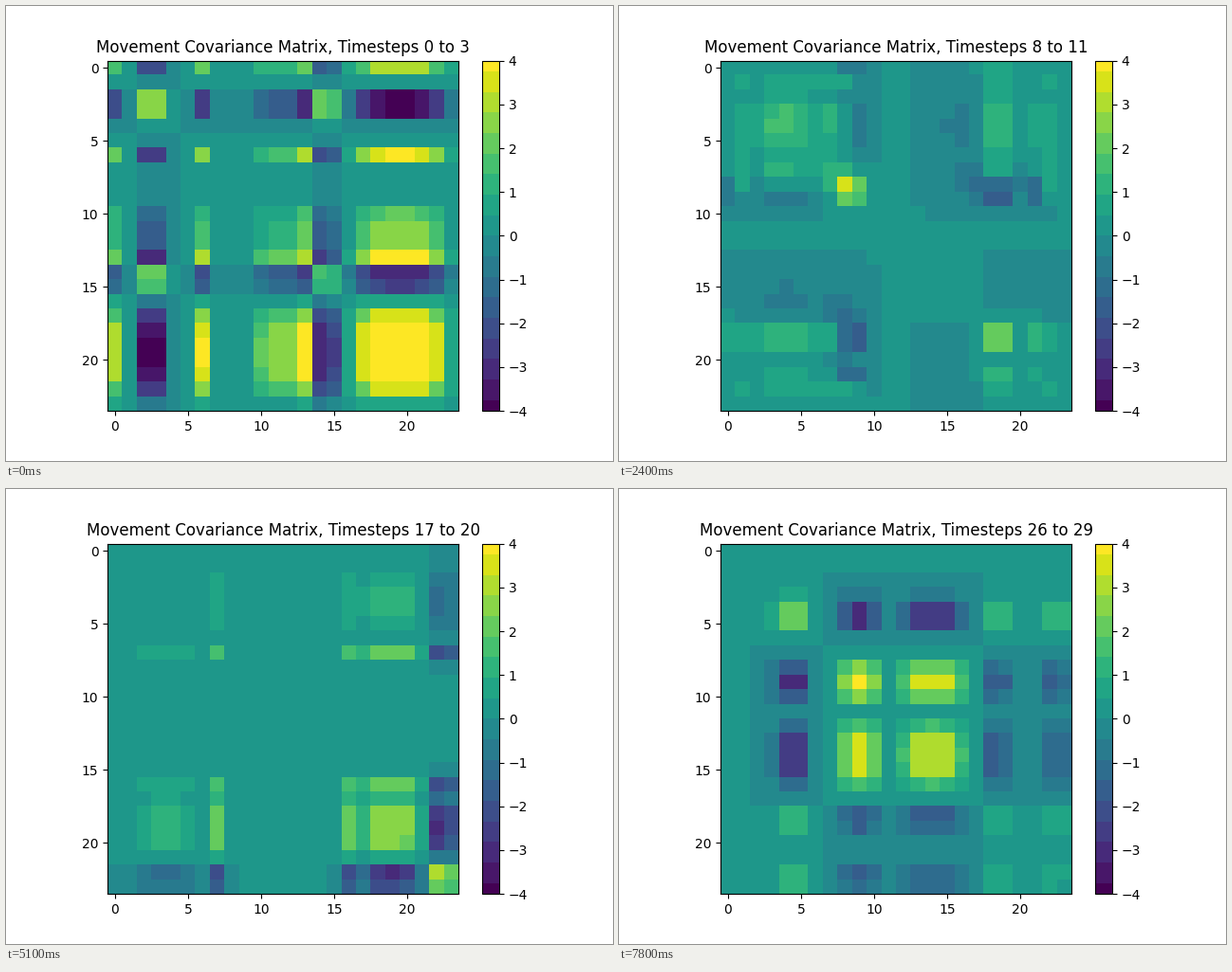
Recreate the animation shown at these times as a matplotlib script. Size 640 by 480 pixels, loop 8 s.

```python
import numpy as np
import matplotlib.pyplot as plt
from matplotlib.animation import FuncAnimation
from matplotlib.colors import ListedColormap

TICK_MS = 100
LOOP_MS = 8000
STEP_MS = 300
LAST_STEP = 26
WINDOW = 3
LEVELS = 18
JOINTS = np.arange(24)

# Movement at selected timesteps as groups of joints that move together:
# (centre joint, half width, strength)
movements = {
    0: [(0, .7, 1.25), (2.5, 1, -1.7), (6, .7, 1.6), (11.5, 2, 1.1),
        (13, .7, 1), (14.3, .9, -1.45), (19.5, 3, 2.4)],
    6: [(0, .7, -.6), (4, 2.6, -.55), (8.3, 1.1, 2), (18.4, 1.5, -1.5),
        (21, .7, -1.15)],
    11: [(1, .9, 1.1), (3.8, 1.7, 1.8), (7.2, 1.4, 1.7), (16, 1.4, -.85),
         (18.5, 1, 1.35), (22, 1, 1.2)],
    15: [(1.7, 2.1, 2.4), (6, .7, -.75), (9.3, 1.6, -1.95), (12.5, 1, -.75),
         (14.5, 1, -2.25), (17.7, 1.3, 2.4), (22.4, .9, 1.35)],
    17: [(3.5, 2, .65), (7, .7, 1.35), (16, .7, 1.3), (18.9, 2, 1.65),
         (22.3, .9, -1.75)],
    21: [(0, .7, -1.1), (2.8, 2, .95), (7.8, 1.5, 1.45), (12, .7, 1.05),
         (15.3, 1.5, 1.55), (18.2, 1.2, -1.7), (20.5, 1, .65), (23, 1, -1.6)],
    26: [(4.4, 1.3, -1.5), (9, 1.2, 2), (14, 2.1, 1.8), (18.4, 1, -.85),
         (22.4, .9, -.8)],
}


def plateau(centre, half_width, strength):
    """Flat-topped bump over the joints."""
    return strength * np.exp(-((JOINTS - centre) / half_width) ** 4)


def movement_covariance(groups):
    direction = sum(plateau(*group) for group in groups)
    return np.outer(direction, direction)


key_steps = list(movements)
key_matrices = [movement_covariance(groups) for groups in movements.values()]


def covariance(step):
    """Blend the covariances of the two nearest known timesteps."""
    right = min(max(np.searchsorted(key_steps, step), 1), len(key_steps) - 1)
    start, end = key_steps[right - 1], key_steps[right]
    weight = (step - start) / (end - start)
    return (1 - weight) * key_matrices[right - 1] + weight * key_matrices[right]


def banded_viridis():
    ramp = np.linspace(0, 1, 256)
    steps = np.round(ramp * (LEVELS - 1)) / (LEVELS - 1)
    return ListedColormap(plt.get_cmap("viridis")(steps))


plt.rcParams["font.family"] = "DejaVu Sans"
fig, ax = plt.subplots(figsize=(6.4, 4.8), dpi=100)
image = ax.imshow(covariance(0), cmap=banded_viridis(), vmin=-4, vmax=4)
fig.colorbar(image, ax=ax)
title = ax.set_title("")


def update(frame):
    step = min(frame * TICK_MS // STEP_MS, LAST_STEP)
    image.set_data(covariance(step))
    title.set_text(f"Movement Covariance Matrix, Timesteps {step} to {step + WINDOW}")
    return image, title


update(0)
animation = FuncAnimation(fig, update, frames=LOOP_MS // TICK_MS,
                          interval=TICK_MS, repeat=True, repeat_delay=0)
plt.show()
```
